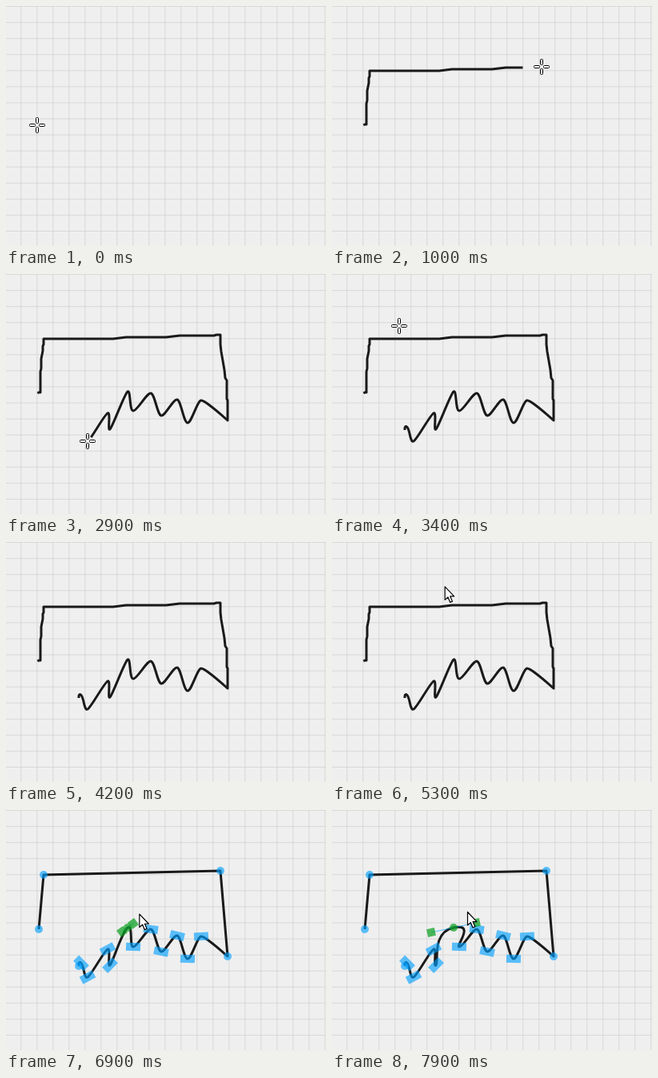
Animation, 400 px wide and 300 px high, one loop 8 s. Source, as an HTML page:

```html
<!DOCTYPE html>
<html lang="en">
<head>
<meta charset="utf-8">
<title>Sketch and edit a path</title>
<style>
html, body { margin: 0; width: 100%; height: 100%; overflow: hidden; background: #efefef; }
svg { display: block; width: 400px; height: 300px; }
#grid { stroke: #d8d8d8; }
.ink { fill: none; stroke: #1a1a1a; stroke-width: 3; stroke-linejoin: round; }
.node { fill: #00a0ff; fill-opacity: .63; }
.live { fill: #0a9f1e; fill-opacity: .72; }
.edge { fill: none; stroke: #00a0ff; stroke-opacity: .65; }
#cross, #arrow { fill: #fff; stroke: #000; stroke-linejoin: round; }
#arrow { stroke-width: 1.2; }
</style>
</head>
<body>
<svg viewBox="0 0 400 300">
  <path id="grid"/>
  <path id="sketch" class="ink"/>
  <path id="curve" class="ink"/>
  <g id="frame"></g>
  <g id="nodes"></g>
  <g id="active">
    <path id="lever" class="edge"/>
    <circle id="hub" class="live" r="5"/>
    <rect id="gripA" class="live" x="-5" y="-5" width="10" height="10"/>
    <rect id="gripB" class="live" x="-5" y="-5" width="10" height="10"/>
  </g>
  <g id="cross"></g>
  <path id="arrow" d="M.5 .5V17L4.3 13.6L7 20L9.8 18.8L7.1 12.6H12Z"/>
</svg>
<script>
const LOOP = 8000, STEP = 100;
const NS = 'http://www.w3.org/2000/svg';
const $ = id => document.getElementById(id);
const show = (el, on) => el.style.display = on ? '' : 'none';
const place = (el, x, y, a = 0) => el.setAttribute('transform', `translate(${x} ${y}) rotate(${a})`);
const setPath = (el, d) => el.setAttribute('d', d);

function add(parent, tag, attrs) {
  const el = document.createElementNS(NS, tag);
  for (const k in attrs) el.setAttribute(k, attrs[k]);
  return parent.appendChild(el);
}
const dot = (parent, cx, cy) => add(parent, 'circle', { class: 'node', cx, cy, r: 5 });
const box = (parent, w, h) => add(parent, 'rect', { class: 'node', x: -w / 2, y: -h / 2, width: w, height: h });

// Linear interpolation over stops of [time, ...values]
function track(stops, t) {
  const i = stops.findIndex(s => s[0] > t);
  if (i <= 0) return stops[i ? stops.length - 1 : 0].slice(1);
  const [t0, ...a] = stops[i - 1], [t1, ...b] = stops[i];
  return a.map((v, j) => v + (b[j] - v) * (t - t0) / (t1 - t0));
}

// Smooth nodes of the zigzag, right to left: x, y, tangent angle
const teeth = [
  [244, 158, -3], [227, 186, 2], [214, 157, 14], [194, 177, 12], [181, 149, 8], [159, 171, 2],
  [152, 147, -35], [130, 194, -45], [127, 174, -28], [102, 209, -28], [94, 191.5, 45]
];
const PICK = 6;
const corners = [[41, 149], [47, 81], [268, 76], [277, 183]], tail = [91, 195];
const tidy = 'M' + corners.join('L');
const rise = 'M39.4 149L41 148H43V122L44 118V106L46 96V90L47 88V81';
const top_ = rise + 'H134L150 79H200L217 77H260L263 76H268';
const rough = top_ + 'V88L269 97L273 120L274 130L276 133V156L277 158V183';

// Continues a path through the first n teeth; pull is the picked node's handle
function zigzag(start, n = teeth.length, pull = [4, -3]) {
  let d = start, from = corners[3];
  teeth.slice(0, n).forEach(([x, y, a], i) => {
    const r = a * Math.PI / 180;
    const [dx, dy] = i === PICK ? pull : [5 * Math.cos(r), 5 * Math.sin(r)];
    d += `C${from} ${x + dx} ${y + dy} ${x} ${y}`;
    from = [x - dx, y - dy];
  });
  return n < teeth.length ? d : d + `C${from} ${tail} ${tail}`;
}

const ruler = document.createElementNS(NS, 'path');
function span(d) {
  setPath(ruler, d);
  return ruler.getTotalLength();
}

// Pen travel along the sketch, timed by landmarks
const penAt = [
  [200, 0], [700, span(rise)], [800, span(rise)], [1000, span(top_) - 6], [1100, span(top_)],
  [1700, span(rough)], [2000, span(zigzag(rough, 2))], [2600, span(zigzag(rough, 7)) + 7],
  [2900, span(zigzag(rough, 10))], [3100, span(zigzag(rough))]
];
const LAG = 22;

const leaveAt = [[3100, ...tail], [3500, 81, 21], [3800, 74, -12], [3900, -27, -1], [4200, 582, -1]];
const arrowAt = [[4900, 140, 14]];
// Each leg: start, end, target; the arrow rests between legs
for (const [from, to, x, y] of [
  [4900, 5500, 141, 76], [5700, 6000, 137, 125], [6000, 6600, 155, 139],
  [6700, 7000, 172, 125], [7200, 7500, 150, 135], [7700, 7900, 169, 127]
]) arrowAt.push([from, ...arrowAt[arrowAt.length - 1].slice(1)], [to, x, y]);
const pullAt = [[7700, 7, -5], [7900, 28, -6]];

let lines = '';
for (let i = 0; i < 20; i++) lines += `M${18.8 + 20 * i} 0v300M0 ${.6 + 20.06 * i}h400`;
setPath($('grid'), lines);
setPath($('sketch'), zigzag(rough));

for (let a = 0; a < 360; a += 90)
  add($('cross'), 'rect', { x: -9.5, y: -1.5, width: 7, height: 3, rx: 1, transform: `rotate(${a})` });

[...corners, tail].forEach(p => dot($('nodes'), ...p));
const tabs = teeth.map(([x, y, a]) => {
  const el = box($('nodes'), 18, 10);
  place(el, x, y, a);
  return el;
});

// Selection frame with resize and turn handles
const mid = [159, 143], half = [153, 102];
add($('frame'), 'path', { class: 'edge', d: 'M6 41H312V245H6ZM159 41V16' });
dot($('frame'), mid[0], 16);
for (const i of [-1, 0, 1])
  for (const j of [-1, 0, 1])
    if (i || j) place(box($('frame'), 10, 10), mid[0] + i * half[0], mid[1] + j * half[1]);

function drawPen(t) {
  const [ink] = track(penAt, t - LAG);
  $('sketch').setAttribute('stroke-dasharray', `${ink} 2000`);
  const tip = $('sketch').getPointAtLength(track(penAt, t)[0]);
  const at = t > 3100 ? track(leaveAt, t) : [tip.x, tip.y];
  place($('cross'), ...at.map(Math.round));
}

function drawActive(dx, dy) {
  const [x, y] = teeth[PICK], a = Math.atan2(dy, dx) * 180 / Math.PI;
  setPath($('lever'), `M${x - dx} ${y - dy}L${x + dx} ${y + dy}`);
  place($('hub'), x, y);
  place($('gripA'), x - dx, y - dy, a);
  place($('gripB'), x + dx, y + dy, a);
}

function draw(t) {
  const editing = t >= 5800, picked = t >= 6200;
  show($('sketch'), !editing);
  show($('curve'), editing);
  show($('nodes'), editing);
  show($('frame'), t >= 5600 && !editing);
  show($('active'), picked);
  show(tabs[PICK], !picked);
  show($('arrow'), t >= 5000);

  const pull = track(pullAt, t);
  setPath($('curve'), zigzag(tidy, teeth.length, pull));
  drawActive(...pull);
  drawPen(t);
  place($('arrow'), ...track(arrowAt, t));
}

function tick() {
  draw(Math.floor(performance.now() % LOOP / STEP) * STEP);
  requestAnimationFrame(tick);
}
tick();
</script>
</body>
</html>
```
